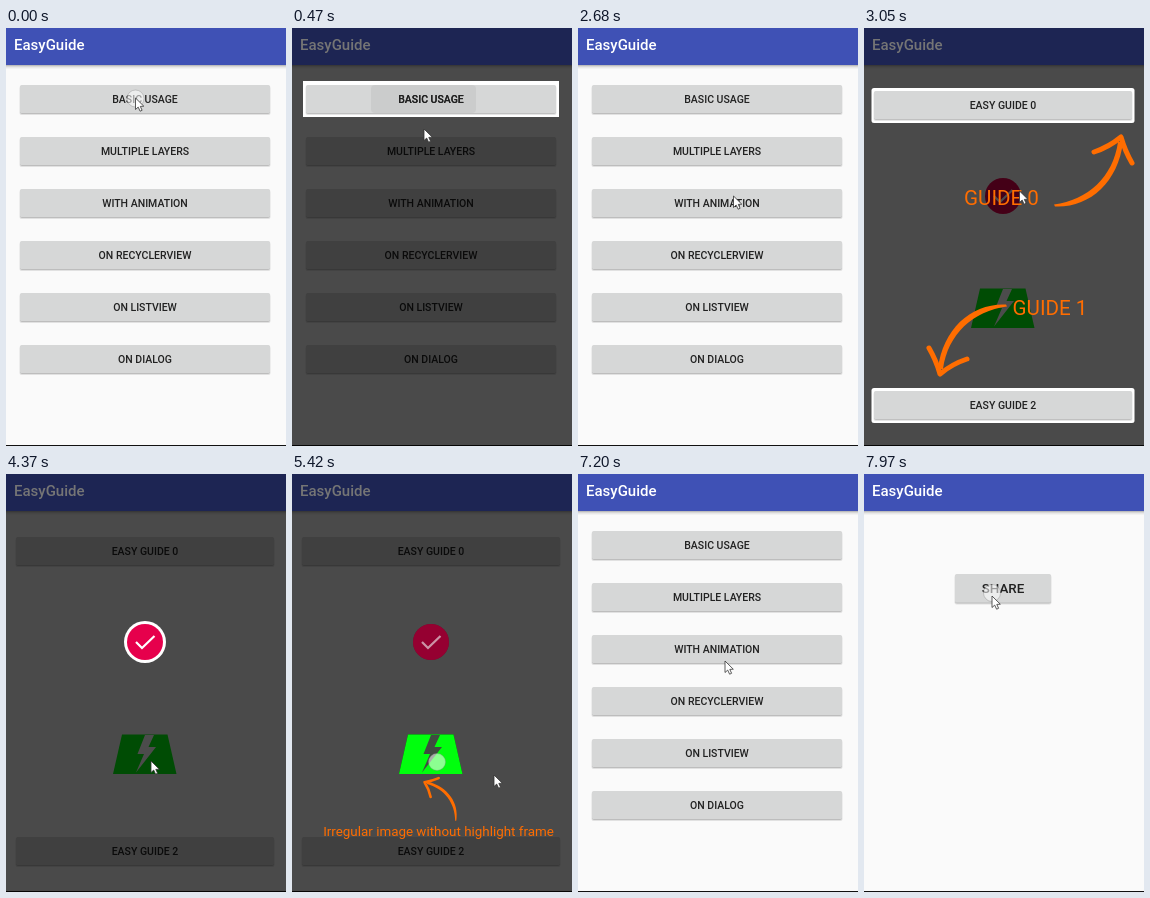
An HTML page with a canvas that plays this animation: 280 px wide and 418 px high, repeating every 8000 ms.

```html
<!DOCTYPE html>
<html lang="en">
<head>
<meta charset="utf-8">
<title>EasyGuide</title>
<style>
  html, body { margin: 0; width: 100%; height: 100%; overflow: hidden; background: #fafafa; }
  canvas { display: block; width: 280px; height: 418px; }
</style>
</head>
<body>
<canvas id="stage"></canvas>
<script>
const W = 280, H = 418, LOOP = 8000;
const FONT = 'Roboto, "Noto Sans", sans-serif';
const ORANGE = '#ff6d00', PAPER = '#fafafa', RED = '#e6004c';
const MENU = ['BASIC USAGE', 'MULTIPLE LAYERS', 'WITH ANIMATION', 'ON RECYCLERVIEW', 'ON LISTVIEW', 'ON DIALOG'];
const dpr = window.devicePixelRatio || 1;

function surface(canvas) {
  canvas.width = W * dpr;
  canvas.height = H * dpr;
  const c = canvas.getContext('2d');
  c.scale(dpr, dpr);
  return c;
}
const stage = surface(document.getElementById('stage'));
const layer = surface(document.createElement('canvas'));
let g = stage;

function box(x, y, w, h, r, fill) {
  g.fillStyle = fill;
  g.beginPath();
  g.roundRect(x, y, w, h, r);
  g.fill();
}

function poly(points, fill) {
  g.fillStyle = fill;
  g.beginPath();
  points.forEach(([x, y]) => g.lineTo(x, y));
  g.closePath();
  g.fill();
}

function disc(x, y, r, fill) {
  g.fillStyle = fill;
  g.beginPath();
  g.arc(x, y, r, 0, 7);
  g.fill();
}

function label(str, x, y, size, color, weight = 400, align = 'center') {
  g.font = `${weight} ${size}px ${FONT}`;
  g.textAlign = align;
  g.fillStyle = color;
  g.fillText(str, x, y);
}

function button(str, x, y, w, h, size = 10.5) {
  box(x - .5, y + 1, w + 1, h + 1, 2, 'rgba(0,0,0,.10)');
  box(x, y + 1, w, h, 2, 'rgba(0,0,0,.16)');
  box(x, y, w, h, 1.5, '#d6d7d7');
  label(str, x + w / 2, y + h / 2 + size * .37, size, '#212121', 500);
}

function page() {
  g.fillStyle = PAPER;
  g.fillRect(0, 0, W, H);
  [.25, .14, .07, .03].forEach((a, i) => {
    g.fillStyle = `rgba(0,0,0,${a})`;
    g.fillRect(0, 37 + i, W, 1);
  });
  g.fillStyle = '#3f51b5';
  g.fillRect(0, 0, W, 37);
  label('EasyGuide', 8, 22, 15, '#fff', 500, 'left');
  g.fillStyle = '#111';
  g.fillRect(0, 417, W, 1);
}

const menuButton = i => button(MENU[i], 14, 57 + 52 * i, 250, 28);
const guideButton = n => button('EASY GUIDE ' + n, 10, 63 + 150 * n, 258, 28);

function badge() {
  disc(139, 168, 18, RED);
  g.strokeStyle = '#fff';
  g.lineWidth = 2.2;
  g.lineCap = 'butt';
  g.lineJoin = 'miter';
  g.beginPath();
  g.moveTo(130, 168);
  g.lineTo(136, 174);
  g.lineTo(148.5, 162);
  g.stroke();
}

function panel(bolt) {
  poly([[116, 260.5], [161.5, 260.5], [170.5, 300], [107, 300]], '#00ff0d');
  poly([[139, 261], [148, 261], [142.5, 273], [150, 273], [130, 298.5], [138, 280], [131.5, 280]], bolt);
}

function menu() {
  page();
  MENU.forEach((_, i) => menuButton(i));
}

function layers() {
  page();
  guideButton(0);
  guideButton(2);
  badge();
  panel('#fff');
}

function share() {
  page();
  button('SHARE', 91, 100, 96, 28.5, 13.4);
}

function dim() {
  g.fillStyle = 'rgba(0,0,0,.54)';
  g.fillRect(0, 0, W, 37);
  g.fillStyle = 'rgba(0,0,0,.7)';
  g.fillRect(0, 37, W, H - 37);
}

// Brush arrow in the unit of its large size: tail at 0,0, tip at 67,-69
function arrow(x, y, turn, scale = 1, flip = 1) {
  g.save();
  g.translate(x, y);
  g.rotate(turn);
  g.scale(scale * flip, scale);
  g.strokeStyle = g.fillStyle = ORANGE;
  g.lineCap = g.lineJoin = 'round';
  g.beginPath();
  g.moveTo(0, -.5);
  g.bezierCurveTo(34, -5, 59, -28, 64, -63);
  g.lineTo(69, -63);
  g.bezierCurveTo(64, -22, 35, 3, 1, 1.5);
  g.closePath();
  g.fill();
  g.lineWidth = 5;
  g.beginPath();
  g.moveTo(40, -53);
  g.quadraticCurveTo(55, -58, 67, -68);
  g.quadraticCurveTo(71, -54, 78, -42);
  g.stroke();
  g.restore();
}

function framed(n) {
  box(7.5, 60 + 150 * n, 263, 35, 2.5, '#fff');
  guideButton(n);
}

function basicGuide() {
  menu();
  dim();
  box(11, 53, 256, 36, 0, '#fff');
  menuButton(0);
  box(79, 57, 105, 28, 4, 'rgba(0,0,0,.05)');
  label(MENU[0], 139, 74.9, 10.5, '#212121', 500);
}

function pairGuide() {
  layers();
  dim();
  framed(0);
  framed(2);
  label('GUIDE 0', 137.5, 177, 20.6, ORANGE);
  label('GUIDE 1', 186, 287, 20.6, ORANGE);
  arrow(190, 177, 0);
  arrow(143, 278, Math.PI);
}

function fadingPair() {
  layers();
  dim();
  g.globalAlpha = .5;
  framed(0);
  framed(2);
  g.globalAlpha = 1;
  disc(139, 168, 21, '#fff');
  badge();
}

function badgeGuide() {
  layers();
  dim();
  disc(139, 168, 21, '#fff');
  badge();
}

function panelGuide() {
  layers();
  dim();
  g.globalAlpha = .5;
  badge();
  g.globalAlpha = 1;
  panel('#3f4b40');
  arrow(163.5, 347, -Math.PI / 2 + .12, .52, 1);
  label('Irregular image without highlight frame', 146.5, 362, 13.4, ORANGE);
}

function pressed(i) {
  menu();
  box(14, 57 + 52 * i, 250, 28, 1.5, 'rgba(0,0,0,.05)');
}

// Draws one screen sliding and fading over another
function over(under, top, alpha, dy) {
  under();
  g = layer;
  top();
  g = stage;
  g.globalAlpha = alpha;
  g.drawImage(layer.canvas, 0, dy, W, H);
  g.globalAlpha = 1;
}

function touch(x, y) {
  disc(x, y, 8.5, 'rgba(255,255,255,.55)');
  g.strokeStyle = 'rgba(130,130,130,.45)';
  g.lineWidth = .8;
  g.stroke();
}

function pointer(x, y) {
  g.save();
  g.translate(x, y);
  poly([[0, 0], [0, 11.5], [2.7, 9.1], [4.6, 13.2], [6.6, 12.3], [4.8, 8.4], [8.3, 8.2]], '#fff');
  g.strokeStyle = '#333';
  g.lineWidth = .8;
  g.lineJoin = 'miter';
  g.stroke();
  g.restore();
}

// [start, draw, pointer, touch]
const scenes = [
  [0, menu, [129.5, 70], [129.5, 70.5]],
  [160, menu, [130.5, 88]],
  [320, menu, [132, 101]],
  [470, basicGuide, [132, 101]],
  [1530, basicGuide, [132, 102], [132, 102]],
  [1700, menu, [139, 120]],
  [1850, () => pressed(1), [141, 127], [141, 127]],
  [1925, () => pressed(1), [143, 141]],
  [2000, () => pressed(1), [147, 156]],
  [2150, () => pressed(1), [152, 163]],
  [2230, () => pressed(1), [155.5, 168]],
  [2680, menu, [155.5, 168]],
  [2820, () => over(menu, layers, .3, 14), [155.5, 166]],
  [2900, () => over(menu, layers, .8, 4), [155.5, 164]],
  [2970, layers, [155.5, 163]],
  [3050, pairGuide, [155.5, 163]],
  [4020, fadingPair, [155.5, 163]],
  [4370, badgeGuide, [145, 287]],
  [5420, panelGuide, [202, 301], [145, 288]],
  [6490, layers],
  [6640, () => over(menu, layers, .65, 6)],
  [6720, () => over(menu, layers, .2, 16)],
  [6890, menu, [150, 170]],
  [7050, menu, [147, 186]],
  [7200, menu, [147, 187]],
  [7660, () => over(menu, share, .3, 14), [140, 160]],
  [7730, () => over(menu, share, .8, 4), [133, 138]],
  [7800, share, [128, 122]],
  [7970, share, [128, 122], [128, 119]]
];

function frame(now) {
  const t = now % LOOP;
  const [, draw, tip, tap] = scenes.findLast(s => s[0] <= t);
  draw();
  if (tap) touch(...tap);
  if (tip) pointer(...tip);
  requestAnimationFrame(() => frame(performance.now() - start));
}

const start = performance.now();
frame(0);
</script>
</body>
</html>
```
